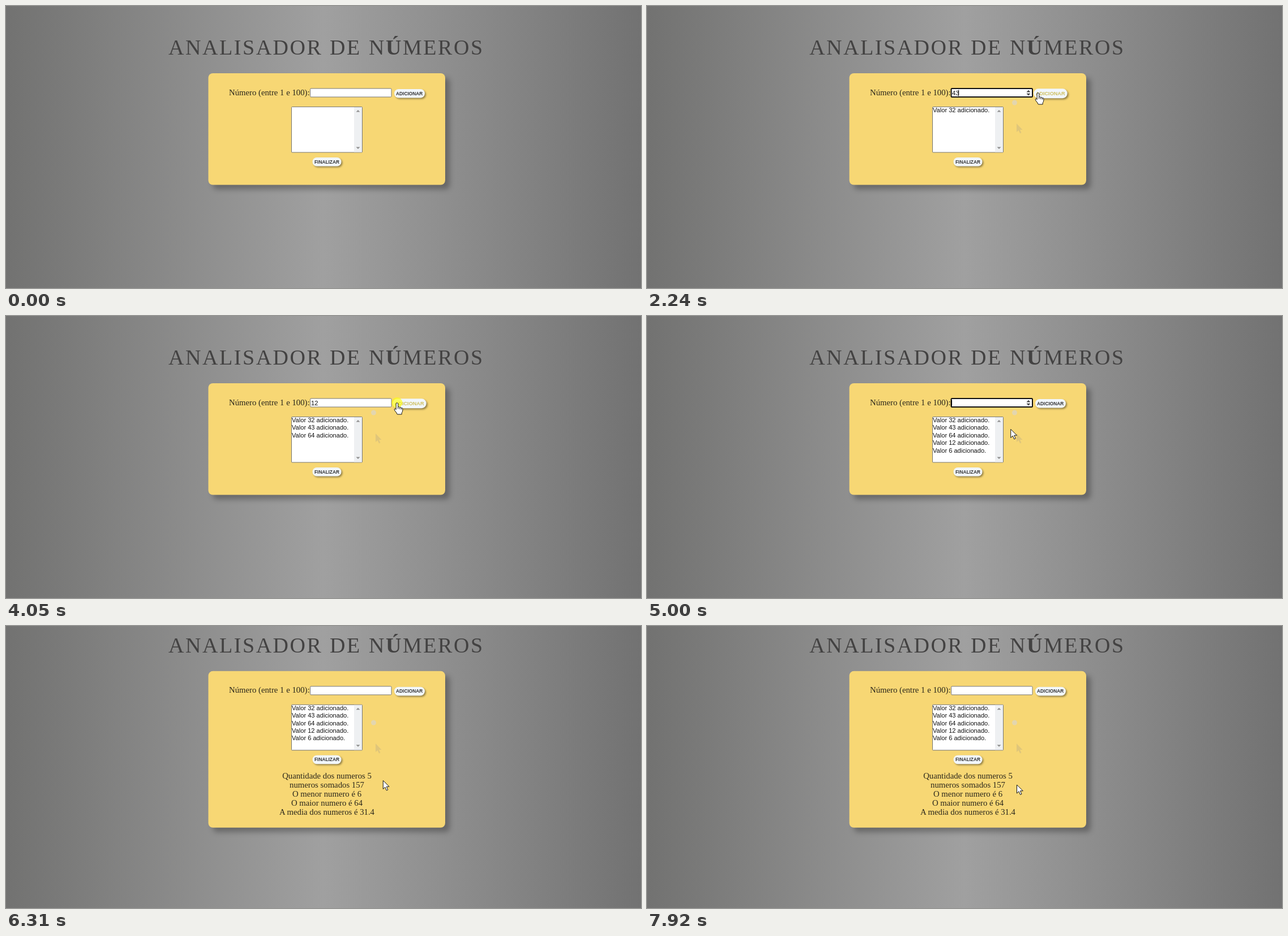
Write an HTML page that moves like this. It is 1122 px wide and 499 px high and loops after 8 s.

```html
<!DOCTYPE html>
<html lang="pt">
<head>
<meta charset="utf-8">
<title>Analisador de números</title>
<style>
html, body { margin: 0; width: 100%; height: 100%; overflow: hidden; }
body { background: linear-gradient(90deg, #727271, #a0a0a0 50%, #727272); }
svg { display: block; }
.serif { font: 14.75px "Liberation Serif", serif; fill: #2a261b; }
.title { font-size: 38px; letter-spacing: 2.55px; fill: #434242; }
.sans { font: 11.1px "Liberation Sans", sans-serif; fill: #111; }
.mid { text-anchor: middle; }
.box { fill: #fff; stroke: #767676; }
.box.focus { stroke: #101010; stroke-width: 2; }
.card { fill: #f7d774; filter: drop-shadow(8px 8px 5px rgba(0,0,0,.28)); }
.button { transform-box: fill-box; transform-origin: center; }
.button rect { fill: #f2f7fc; filter: drop-shadow(2px 2px 1.5px rgba(0,0,0,.4)); }
.button text { font: bold 8.34px "Liberation Sans", sans-serif; fill: #333; }
.button.hover { transform: scale(1.1); }
.button.hover text { fill: #cfc062; }
</style>
</head>
<body>
<svg width="1122" height="499" viewBox="0 0 1122 499">
  <g id="page">
    <g class="serif title">
      <text x="287" y="86">ANALISADOR</text>
      <text x="572" y="86">DE</text>
      <text x="641" y="86">N<tspan font-weight="bold">Ú</tspan>MEROS</text>
    </g>
    <rect id="card" class="card" x="357.5" y="119" width="418.5" rx="8"/>
    <text class="serif" x="394" y="157.5">Número (entre 1 e 100):</text>
    <rect id="field" class="box" x="537.5" y="146" width="143.5" height="15" rx="1.5"/>
    <text id="value" class="sans" x="539" y="157.5"></text>
    <path id="caret" d="M0 148.5V159.5" stroke="#000"/>
    <path id="spinner" d="M670.5 152.5L674 148.8L677.5 152.5ZM670.5 154.8L674 158.5L677.5 154.8Z" fill="#444"/>
    <g id="add" class="button">
      <rect x="686" y="147" width="54" height="15.5" rx="7.75"/>
      <text class="mid" x="712.7" y="157.5">ADICIONAR</text>
    </g>
    <rect class="box" x="504.5" y="178.5" width="125" height="80.5" rx="1"/>
    <path d="M615 179H629V258.5H615Z" fill="#eef0f2"/>
    <path d="M618.5 187.5L622 184L625.5 187.5ZM618.5 249.5L622 253L625.5 249.5Z" fill="#8f8f8f"/>
    <g id="list" class="sans"></g>
    <g id="finish" class="button">
      <rect x="541.5" y="268" width="51" height="15.5" rx="7.75"/>
      <text class="mid" x="567" y="278.7">FINALIZAR</text>
    </g>
    <g id="results" class="serif mid"></g>
  </g>
  <g id="trail">
    <circle cx="649.5" cy="171" r="4.5" fill="#e3d6ae"/>
    <path d="M653 208V223L656.5 220L659 225.5L661.5 224.3L659 219H663.5Z" fill="#e0c67a"/>
  </g>
  <g id="cursor">
    <circle id="press" r="9.5" fill="#ff0" fill-opacity=".62"/>
    <path id="arrow" d="M0 0V15L3.5 11.7L6 17.5L8.5 16.4L6 10.8H10.8Z" fill="#fff" stroke="#111"/>
    <path id="beam" d="M-1-6H1.3L2-5L2.7-6H5M-1 7H1.3L2 6L2.7 7H5M2-5V6" fill="none" stroke="#444"/>
    <path id="hand" d="M-1.8 1.2Q0-1 1.8 1.2V7.5Q4 6.2 4.8 8.3Q6.8 7.2 7.4 9.2Q9.8 8.4 9.8 11V14Q9.6 16 8.2 18V20.5H.4Q-.8 17.5-3.6 14.5Q-5.4 12-4.6 11Q-3.4 10.2-1.8 12ZM1.8 7.5V11M4.8 8.5V11.5M7.4 9.5V12" fill="#fff" stroke="#111"/>
  </g>
</svg>
<script>
const LOOP = 8000, STEP = 67.5, RESULT_AT = 5770;
const $ = id => document.getElementById(id);
const show = (id, on) => $(id).setAttribute('visibility', on ? 'visible' : 'hidden');

const typed = [[0, ''], [1170, '3'], [1300, '32'], [1840, ''], [2100, '4'], [2240, '43'],
  [2570, ''], [2770, '6'], [3040, '64'], [3390, ''], [3590, '1'], [3720, '12'],
  [4120, ''], [4390, '6'], [4730, '']];
const presses = [[890, 1090], [1710, 1840], [2440, 2570], [3260, 3390],
  [4050, 4120], [4660, 4730], [5640, RESULT_AT]];
const numbers = [32, 43, 64, 12, 6];
const addedAt = [1840, 2570, 3390, 4120, 4730];

// Pointer path: time, x, y
const path = [[0, 1140, 520], [67, 1086, 479], [330, 850, 325], [600, 690, 235], [740, 653, 208],
  [820, 645, 163], [890, 644, 157], [1400, 644, 157], [1620, 691, 153.5], [4730, 691, 153.5],
  [5400, 569, 272], [5600, 569, 281.5], [6100, 569, 281.5], [6200, 640, 256], [6270, 666, 272],
  [6560, 678, 328], [6860, 674, 258], [7000, 676, 272], [7260, 679, 324], [7600, 668, 259],
  [7760, 655, 277], [7880, 653.5, 281]];

function pointer(t) {
  const i = path.findIndex(p => p[0] > t);
  if (i < 0) return path.at(-1).slice(1);
  const [t0, x0, y0] = path[i - 1], [t1, x1, y1] = path[i];
  const k = (t - t0) / (t1 - t0);
  return [x0 + (x1 - x0) * k, y0 + (y1 - y0) * k];
}

function lines(id, texts, x, y, gap) {
  const made = texts.map((text, i) => {
    const node = document.createElementNS('http://www.w3.org/2000/svg', 'text');
    node.setAttribute('x', x);
    node.setAttribute('y', y + i * gap);
    node.textContent = text;
    return node;
  });
  $(id).replaceChildren(...made);
  return made;
}

const sum = numbers.reduce((a, b) => a + b);
const rows = lines('list', numbers.map(n => `Valor ${n} adicionado.`), 505, 188, 13.4);
lines('results', [
  `Quantidade dos numeros ${numbers.length}`,
  `numeros somados ${sum}`,
  `O menor numero é ${Math.min(...numbers)}`,
  `O maior numero é ${Math.max(...numbers)}`,
  `A media dos numeros é ${sum / numbers.length}`
], 567, 309.7, 15.9);

function draw(now) {
  const t = now % LOOP;
  const [x, y] = pointer(Math.floor(t / STEP + 1e-6) * STEP);
  const within = (l, top, r, b) => x >= l && x <= r && y >= top && y <= b;
  const done = t >= RESULT_AT;
  const pressed = presses.some(([a, b]) => t >= a && t < b);
  const focus = t >= 1090 && t < 5640 && !pressed;
  const onField = !done && within(537, 146, 681, 162);
  const onAdd = !done && within(684, 146, 743, 163);
  const onFinish = !done && within(539, 267, 596, 285);
  const beam = onField || done && within(484, 258, 650, 336);
  const hand = onAdd || onFinish;

  $('page').setAttribute('transform', `translate(0 ${done ? -39.2 : 0})`);
  $('card').setAttribute('height', done ? 277 : 197.5);
  show('results', done);

  const value = typed.findLast(e => t >= e[0])[1];
  $('value').textContent = value;
  $('field').classList.toggle('focus', focus);
  show('caret', focus);
  $('caret').setAttribute('transform', `translate(${538.5 + value.length * 6.1} 0)`);
  show('spinner', focus || onField);
  rows.forEach((row, i) => row.setAttribute('visibility', t >= addedAt[i] ? 'visible' : 'hidden'));
  $('add').classList.toggle('hover', onAdd);
  $('finish').classList.toggle('hover', onFinish);

  show('trail', t >= 820);
  $('cursor').setAttribute('transform', `translate(${x} ${y})`);
  show('press', pressed);
  show('beam', beam);
  show('hand', hand);
  show('arrow', !beam && !hand);
}

const start = performance.now();
function tick() {
  draw(performance.now() - start);
  requestAnimationFrame(tick);
}
tick();
</script>
</body>
</html>
```
